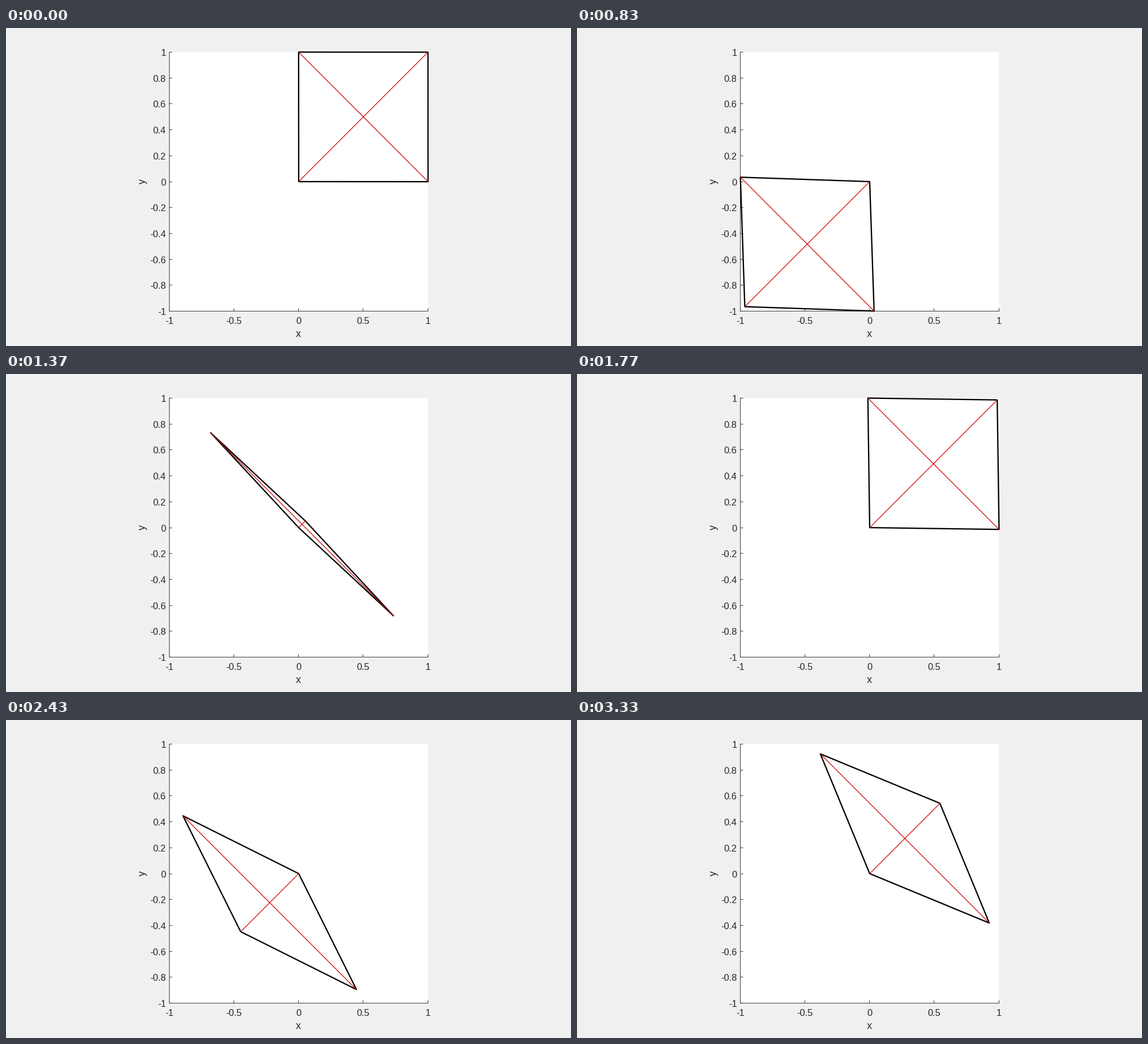
Write a matplotlib script that moves like this. It is 998 by 561 pixels and loops after 3360 ms.

```python
import numpy as np
import matplotlib.pyplot as plt
from matplotlib.animation import FuncAnimation
from matplotlib.patches import Polygon, Rectangle

W, H, DPI = 998, 561, 64
PX = 72 / DPI                       # points per pixel
ORIGIN = np.array([517, 271])
UNIT = 228.5
INK = "#262626"
RED = "#d00000"

plt.rcParams["font.family"] = "Liberation Sans"

fig = plt.figure(figsize=(W / DPI, H / DPI), dpi=DPI, facecolor="#f0f0f0")
ax = fig.add_axes([0, 0, 1, 1])
ax.set_xlim(0, W)
ax.set_ylim(H, 0)
ax.axis("off")


def to_px(points):
    return ORIGIN + UNIT * np.asarray(points) * [1, -1]


def stroke(xs, ys, width=0.9, color=INK, **style):
    return ax.plot(xs, ys, color=color, lw=width * PX, snap=False,
                   solid_capstyle="butt", **style)[0]


def label(x, y, text, size, **style):
    ax.text(x, y, text, fontsize=size * PX, color=INK, va="baseline", **style)


def pixel_center(v):
    return np.floor(v) + 0.5


def draw_axes():
    left, top = to_px((-1, 1))
    right, bottom = to_px((1, -1))
    ax.add_patch(Rectangle((left, top), right - left, bottom - top,
                           fc="white", ec="none", snap=False))
    stroke([left, left], [top - 0.5, bottom + 0.5])
    stroke([left, right + 0.5], [bottom, bottom])
    for v in np.linspace(-1, 1, 11):
        y = pixel_center(to_px((0, v))[1])
        stroke([left, left + 5], [y, y])
        label(282.5, y + 6, f"{round(v, 1) + 0:g}", 16.5, ha="right")
    for v in np.linspace(-1, 1, 5):
        x = pixel_center(to_px((v, 0))[0] - 0.5)
        stroke([x, x], [bottom, bottom - 5])
        label(x, 522, f"{v:g}", 16.5, ha="center")
    label(516.5, 545, "x", 18, ha="center")
    label(245.5, 270.5, "y", 18, ha="center", rotation=90,
          rotation_mode="anchor")


def hinge_angle(step):
    """Angle of the lower arm below the x axis, swinging from 0 to 90 degrees."""
    half, width, start = 26.22, 3.65, -0.13
    j = np.arange(-2, 8)
    swing = 1.003 * np.sum((-1.0) ** j / np.cosh((step - start - j * half) / width))
    swing *= 1 - 0.19 * np.exp(-20 * swing ** 2)    # slower near the flat pose
    return np.radians(45 * (1 - swing))


draw_axes()
rhombus = ax.add_patch(Polygon(np.zeros((4, 2)), closed=True, fill=False,
                               ec="black", lw=2.3 * PX, joinstyle="round",
                               snap=False, zorder=4))
diagonals = [stroke([], [], 1.25, RED, zorder=5) for _ in range(2)]


def update(tick):
    # the pose changes 30 times a second on a 10 ms clock
    angle = hinge_angle((6 * tick + 3) // 20)
    c, s = np.cos(angle), np.sin(angle)
    o, a, b = np.zeros(2), np.array([c, -s]), np.array([-s, c])
    rhombus.set_xy(to_px([o, a, a + b, b]))
    for line, ends in zip(diagonals, ([o, a + b], [a, b])):
        line.set_data(*to_px(ends).T)
    return [rhombus, *diagonals]


anim = FuncAnimation(fig, update, frames=336, interval=10, repeat=True,
                     repeat_delay=0, blit=False)
plt.show()
```
